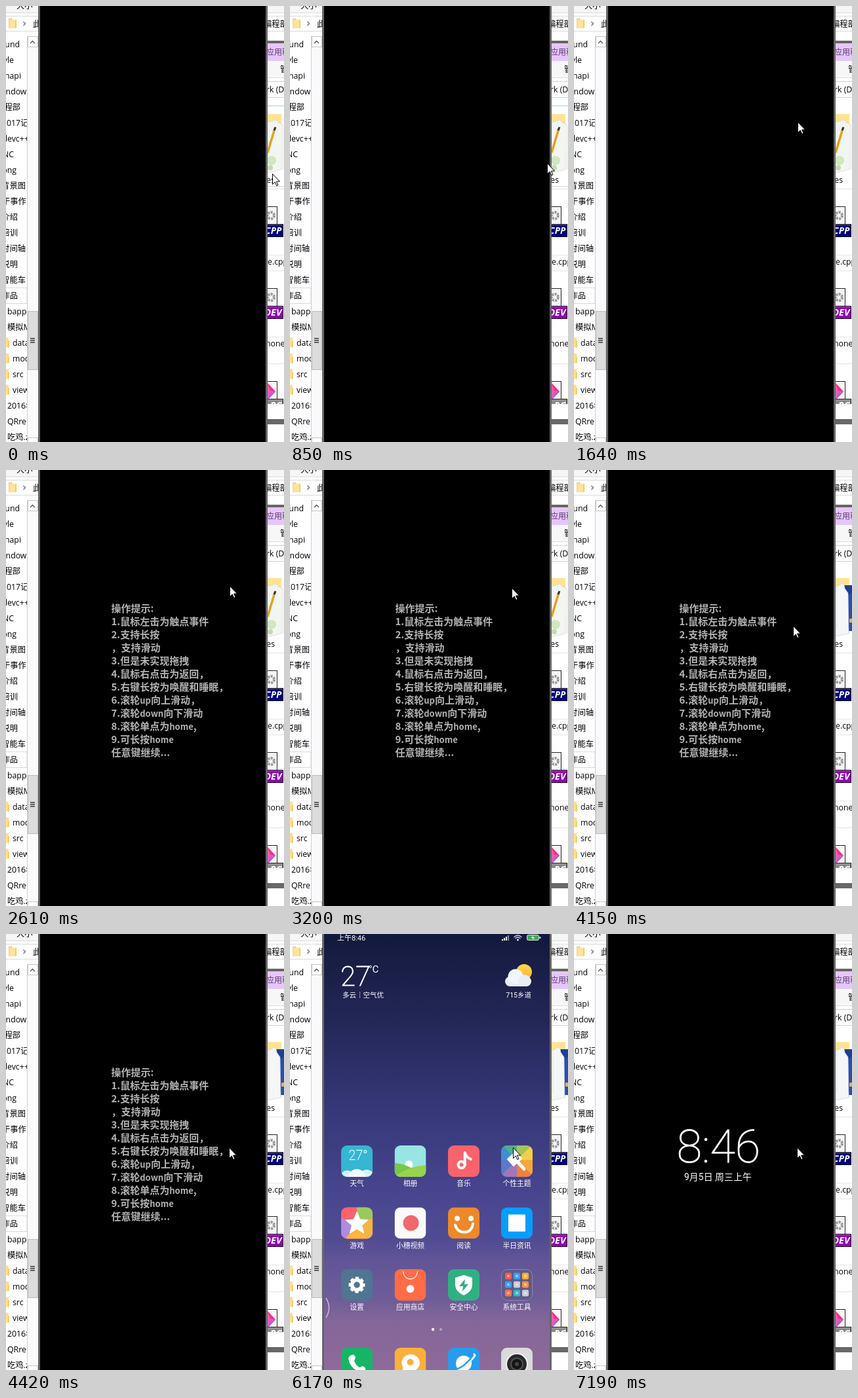
Animation of 424x666 px, one loop 8 s. Source, as an HTML page:

```html
<!DOCTYPE html>
<html lang="zh-CN">
<head>
<meta charset="utf-8">
<title>Phone mirror</title>
<style>
html, body { margin: 0; width: 100%; height: 100%; overflow: hidden; background: #fff; }
svg { display: block; }
text { font-family: "Open Sans", "Noto Sans CJK SC", sans-serif; white-space: pre; }
.phone text { font-family: Roboto, "Noto Sans CJK SC", sans-serif; fill: #fff; }
.hints text { font-family: "Noto Sans CJK SC", sans-serif; font-weight: 700; fill: #b2b2b2; }
.thin { font-weight: 100; stroke: #fff; }
</style>
</head>
<body>
<svg id="stage" width="424" height="666" viewBox="0 0 424 666">
  <defs>
    <linearGradient id="sky" x1="0" y1="0" x2="0" y2="1">
      <stop offset="0" stop-color="#13193c"/>
      <stop offset=".2" stop-color="#232757"/>
      <stop offset=".4" stop-color="#363779"/>
      <stop offset=".6" stop-color="#48468f"/>
      <stop offset=".7" stop-color="#514b93"/>
      <stop offset=".75" stop-color="#615597"/>
      <stop offset=".84" stop-color="#6f5d98"/>
      <stop offset=".89" stop-color="#856699"/>
      <stop offset="1" stop-color="#8d6a99"/>
    </linearGradient>
    <linearGradient id="sun" x1="0" y1="0" x2="0" y2="1">
      <stop offset="0" stop-color="#ffd84a"/><stop offset="1" stop-color="#ffae2e"/>
    </linearGradient>
    <clipPath id="tile"><rect width="48" height="48" rx="9"/></clipPath>
    <clipPath id="screen"><rect x="52" width="344" height="666"/></clipPath>
  </defs>
  <rect width="424" height="666" fill="#fff"/>
  <g id="left"></g>
  <g id="right"></g>
  <rect x="49" width="350" height="666" fill="#666"/>
  <rect x="52" width="344" height="666" fill="#000"/>
  <g class="hints" id="hints"></g>
  <g class="phone" id="home" clip-path="url(#screen)"></g>
  <g class="phone" id="lock">
    <text class="thin" x="220.5" y="349" font-size="70" text-anchor="middle" stroke-width=".9">8:46</text>
    <text x="219.5" y="376" font-size="14" text-anchor="middle">9月5日 周三上午</text>
  </g>
  <path id="cursor" d="M.5 .5V16.5L4.3 12.9 6.8 18.6 9 17.6 6.5 12H11.5Z" fill="#fff" stroke="#000"/>
</svg>
<script>
const LOOP = 8000;
const $ = id => document.getElementById(id);
const rect = (x, y, w, h, fill, more = '') =>
  `<rect x="${x}" y="${y}" width="${w}" height="${h}" fill="${fill}" ${more}/>`;
const disc = (x, y, r, fill, more = '') => `<circle cx="${x}" cy="${y}" r="${r}" fill="${fill}" ${more}/>`;
const shape = (d, fill, more = '') => `<path d="${d}" fill="${fill}" ${more}/>`;
const line = (d, color, width = 1, more = '') => shape(d, 'none', `stroke="${color}" stroke-width="${width}" ${more}`);
const text = (x, y, s, size = 12.3, more = '') => `<text x="${x}" y="${y}" font-size="${size}" ${more}>${s}</text>`;
const END = 'text-anchor="end"', MID = 'text-anchor="middle"', ROUND = 'stroke-linecap="round"';

// Toolbar and address bar shared by both sides
const bars = (x, w) => rect(x, 0, w, 10, '#f5f6f7') + rect(x, 10, w, 1, '#dadbdc') +
  rect(x, 15, w, 1, '#d9d9d9') + rect(x, 38, w, 1, '#d9d9d9');

function leftPane() {
  // Each row: label, x, and whether x is the right edge
  const rows = [['ound', 21, 1], ['style', 12, 1], ['nnapi', 23, 1], ['indows', -3.5], ['编程部', 22, 1],
    ['2017记', -6], ['devc++', -5.5], ['VNC', 12, 1], ['png', 16, 1], ['背景图', 30, 1], ['干事作品', -6],
    ['介绍', 18, 1], ['培训', 18, 1], ['时间轴', 30, 1], ['说明', 18, 1], ['智能车', 30, 1], ['作品', 18, 1],
    ['bapp', 2], ['模拟M', 2], ['data', 10], ['mod', 10], ['src', 10], ['view', 10],
    ['2016年', 2], ['QRre', 2], ['吃鸡.z', 2]];
  let s = bars(0, 49) + text(16, 4, '大小') +
    shape('M4 19h5l1 2h6v13h-12z', '#f5cf69') + shape('M5 21h9v13h-9z', '#ffe39a') +
    line('M26.5 24l3 3-3 3', '#666', 1.2) + text(41, 31.5, '此') +
    rect(-1, 430.5, 33, 24, '#fff', 'stroke="#d9d9d9"');
  rows.forEach(([label, x, end], i) => {
    const y = 62.5 + i * 24;
    if (x === 10) s += rect(0, y - 12, 4, 15, '#ffe08a') + rect(3, y - 7, 1.5, 10, '#f0c04c');
    s += text(x, y, label, 12.3, end ? END : '');
  });
  return s + rect(32, 46, 17, 620, '#fafafc') + rect(32, 46, 1, 620, '#d0d0d0') +
    rect(33.5, 46.5, 15, 16, '#fff', 'stroke="#c4c4c4"') + line('M37 57l3.5-3.5 3.5 3.5', '#555', 1.4) +
    rect(33.5, 466.5, 15, 89, '#dcdcdc', 'stroke="#bcbcbc"') +
    [507, 510, 513].map(y => rect(37, y, 7, 1.6, '#444')).join('') +
    rect(33.5, 659.5, 15, 16, '#fff', 'stroke="#c4c4c4"');
}

const badge = (y, label, color) => rect(385.5, y + .5, 37, 19, color, 'stroke="#111"') +
  line(`M386 ${y + 1.5}h36`, '#fff', .6, 'opacity=".5"') +
  text(420.5, y + 15, label, 14.5, END + ' font-weight="700" font-style="italic" fill="#fff"');

const fileIcon = (y, label, color) => rect(385.5, y + .5, 28, 46, '#f4f4f4', 'stroke="#222"') +
  disc(404, y + 14, 5, 'none', 'stroke="#999" stroke-width="4" stroke-dasharray="3 1.5"') + badge(y + 27, label, color);

function rightPane() {
  return bars(399, 25) + text(393, 31.5, '编程部') +
    rect(399, 53, 25, 4, '#666') + rect(399, 57, 25, 27, '#e6c6fa') + text(397, 74.5, '应用程', 12, 'fill="#5b3a70"') +
    rect(399, 84, 25, 26, '#f7f7f8') + text(418, 100.5, '管') + rect(399, 109, 25, 1, '#dadbdc') +
    rect(399, 115, 25, 1, '#d0d0d0') + rect(399, 139, 25, 1, '#d0d0d0') + text(397, 131.5, 'rk (D') +
    // folder preview, two states
    shape('M399 165h21v85h-21z', '#ffe394') +
    `<g id="sketch">` + shape('M399 178l13-4 3 4 7 3-3 69-20 5z', '#f3f5f3', 'stroke="#d5d8d2" stroke-width=".7"') +
    disc(405, 236, 7, '#b9dd9d', 'opacity=".6"') + disc(403, 247, 4, '#8fc56f', 'opacity=".5"') +
    line('M399 224l11-37', '#e6a11b', 3.5) + line('M409 190l2-5', '#333', 3) + shape('M420 183h4v67h-5z', '#f1f3ee') + `</g>` +
    `<g id="photo">` + rect(404, 176, 20, 70, '#1d3f95') +
    shape('M404 205l20-18v59h-20z', '#284fae') + rect(414, 220, 5, 6, '#e8503e') + rect(420, 227, 4, 6, '#f2b04a') +
    shape('M399 179l10-6q4 2 4 8l5 7 1 62-20 4z', '#f5f6f8', 'stroke="#d0d4da" stroke-width=".7"') +
    line('M401 180v64', '#e3e5ea') + `</g>` +
    text(410, 269.5, 'es', 12.3, END) +
    rect(399, 279, 25, 1, '#e2e2e2') +
    `<g id="hover">` + rect(399, 152, 25, 1, '#99d1ff') + rect(399, 275, 25, 1, '#c9d6df') + `</g>` +
    fileIcon(306, 'CPP', '#00007e') + rect(399, 380, 25, 1, '#e6e6e6') + text(399, 394.5, 'e.cpp') + rect(399, 404, 25, 1, '#e2e2e2') +
    fileIcon(431, 'DEV', '#9300b5') + rect(399, 505, 25, 1, '#e6e6e6') + text(396, 519.5, 'none.') + rect(399, 546, 25, 1, '#e2e2e2') +
    rect(385.5, 573.5, 28, 46, '#f8f8f8', 'stroke="#222"') +
    shape('M399 576l12 13-12 13z', '#f05cae') + shape('M399 576l12 13-8-1z', '#f2337c') + shape('M399 602l12-13-8 1z', '#b45cf0') +
    badge(600, 'RC', '#8b8b8b') +
    rect(399, 608, 25, 23, '#fff') + rect(399, 631, 25, 8, '#686868');
}

const wedges = (cx, cy, colors) => colors.map((c, i) => {
  const p = k => { const a = k / colors.length * 2 * Math.PI; return `${cx + 60 * Math.sin(a)} ${cy - 60 * Math.cos(a)}`; };
  return shape(`M${cx} ${cy}L${p(i)}L${p(i + 1)}Z`, c);
}).join('');

const star = (cx, cy, r) => shape('M' + Array.from({ length: 10 }, (_, i) => {
  const a = i * Math.PI / 5, q = i % 2 ? r * .45 : r;
  return `${cx + q * Math.sin(a)} ${cy - q * Math.cos(a)}`;
}).join('L') + 'Z', '#fff', 'stroke="#fff" stroke-linejoin="round"');

const apps = [
  ['天气', '#35b6d3', text(26, 22, '27°', 20, MID + ' class="thin" stroke-width=".4"') +
    disc(9, 48, 10, '#d9f1f6') + disc(39, 49, 12, '#d9f1f6') + disc(24, 49, 13, '#f4fbfc')],
  ['相册', '#97e6e3', disc(22, 29, 6, '#fff') + shape('M0 27Q14 27 30 37L48 48H0Z', '#79c64a') + shape('M0 47Q24 31 48 30V48H0Z', '#98d24e')],
  ['音乐', '#f8636c', disc(20.5, 29.5, 5, 'none', 'stroke="#fff" stroke-width="4"') + line('M25.7 30V11q2 7 9 10', '#fff', 4, 'stroke-linejoin="round" ' + ROUND)],
  ['个性主题', '#4a8fd8', wedges(24, 22, ['#a6c356', '#f2cf48', '#f6a93a', '#f0803e', '#a276b8', '#5b79c8', '#3f8fd0', '#4fb08c']) +
    shape('M10 21L22 10 31 20 19 31Z', '#fff', 'stroke="#fff" stroke-width="2" stroke-linejoin="round"') + line('M25 25L35 36', '#fff', 5, ROUND)],
  ['游戏', '#f8636c', wedges(24, 24, ['#9cc95f', '#f3b545', '#ffb53d', '#b08ade', '#f8636c']) + star(24, 25, 18)],
  ['小穗视频', '#fafafa', disc(25, 24, 12, '#f0696f')],
  ['阅读', '#ed882b', disc(14, 17, 4, '#fff') + disc(35, 17, 4, '#fff') + line('M11 27Q14 38 25 38T38 25', '#fff', 4, ROUND)],
  ['半日资讯', '#069efc', rect(11, 11, 26, 26, '#fff')],
  ['设置', '#507492', disc(24, 24, 7.5, 'none', 'stroke="#fff" stroke-width="5.5"') +
    disc(24, 24, 10.8, 'none', 'stroke="#fff" stroke-width="3.4" stroke-dasharray="5.2 3.28" stroke-dashoffset="2.6"')],
  ['应用商店', '#ff6c46', line('M13 4Q15 15 24 15T35 4', '#fff', 1.3, ROUND) + disc(24, 30, 6, '#fff')],
  ['安全中心', '#30b082', shape('M24 9l13 4v11q0 10-13 16q-13-6-13-16V13z', '#fff') + shape('M26 15l-9 11h6l-1 8 9-11h-6z', '#30b082')],
  ['系统工具', '#5f5a8c', rect(.5, .5, 47, 47, 'none', 'rx="9" stroke="#8f88ad"') +
    ['#fb5b50', '#3aa0f0', '#ffb02e', '#3a9ff0', '#c9ccd8', '#ff8f3b', '#ff7043', '#34b6c8', '#c9ccd8'].map((c, i) => {
      const x = 6 + i % 3 * 13, y = 5.5 + (i / 3 | 0) * 13;
      return rect(x, y, 10, 10, c, 'rx="2"') + disc(x + 5, y + 5, 2, '#fff', 'opacity=".5"');
    }).join('')],
  ['', '#16b566', shape('M16 11q4-2 6 4l-2 5q2 7 8 10l5-2q5 2 4 6q-4 6-12 2q-12-7-14-19q0-4 5-6z', '#fff')],
  ['', '#fbb03a', shape('M24 10a14 13 0 1 1-7 24l-6 3 2-7a14 13 0 0 1 11-20z', '#fff') + disc(24, 22, 5, '#fbb03a')],
  ['', '#279cee', disc(24, 24, 12, '#fff') + line('M8 36Q12 38 28 25T40 10', '#fff', 3, ROUND) + line('M13 33Q24 29 35 16', '#279cee', 2.5)],
  ['', '#dadada', disc(24, 25, 17, '#f3f3f3') + disc(24, 25, 15, '#2a2a2a') + disc(24, 25, 10, '#555') + disc(24, 25, 8, '#161616') + disc(24, 25, 3, '#444')]
];

function homeScreen() {
  const colX = [78, 159.5, 241, 322], rowY = [323, 417.5, 512, 632];
  let s = rect(52, 0, 344, 666, 'url(#sky)') + text(72, 10, '上午8:46', 11) +
    [0, 1, 2, 3].map(i => rect(323 + i * 3, 8 - i * 2, 2, 2 + i * 2, '#fff', i > 2 ? 'opacity=".5"' : '')).join('') +
    line('M341.5 5q6-6 12 0M343.5 7q4-4 8 0', '#c9cbdc', 1.2) + disc(347.5, 9, 1.4, '#fff') +
    rect(361.5, 1.5, 18, 8, '#37b24a', 'rx="2" stroke="#e6e6e6"') + rect(380.5, 4, 1.8, 3, '#e6e6e6') +
    shape('M371.5 2l-4 4h3l-1 3 4-4h-3z', '#fff') +
    text(77, 79, '27', 42, 'class="thin" stroke-width="1"') + text(120, 58.5, '°C', 15) +
    text(80, 97, '多云｜空气优', 10.5) + text(368, 97, '715乡道', 10.5, END) +
    disc(357, 58, 12, 'url(#sun)') +
    rect(328, 65, 40, 15, '#e6edf9', 'rx="7.5"') + disc(344, 65, 11.5, '#f1f5fc') + disc(358, 71, 9, '#e6edf9') +
    line('M55 556q9 15 0 30', '#fff', 1.6, 'opacity=".55"') +
    disc(218, 604, 2.2, '#fff') + disc(230, 604, 2.2, '#fff', 'opacity=".35"');
  apps.forEach(([name, color, art], i) => {
    const x = colX[i % 4], y = rowY[i >> 2];
    s += `<g transform="translate(${x} ${y})" clip-path="url(#tile)">${rect(0, 0, 48, 48, color)}${art}</g>` +
      text(x + 24, y + 62, name, 10.8, MID);
  });
  return s;
}

const hints = ['操作提示:', '1.鼠标左击为触点事件', '2.支持长按', '，支持滑动', '3.但是未实现拖拽', '4.鼠标右点击为返回，',
  '5.右键长按为唤醒和睡眠，', '6.滚轮up向上滑动，', '7.滚轮down向下滑动', '8.滚轮单点为home,', '9.可长按home', '任意键继续...'];
const small = s => s.replace(/[a-z]+/g, '<tspan font-size="13">$&</tspan>');

$('left').innerHTML = leftPane();
$('right').innerHTML = rightPane();
$('hints').innerHTML = hints.map((h, i) => text(160.5, 217 + i * 20, small(h), 15)).join('');
$('home').innerHTML = homeScreen();

// Hold each value until the next step
function play(id, prop, steps) {
  const frames = steps.map(([t, value]) => ({ offset: t / LOOP, [prop]: value, easing: 'step-end' }));
  frames.push({ offset: 1, [prop]: steps[steps.length - 1][1] });
  $(id).animate(frames, { duration: LOOP, iterations: Infinity });
}

const path = [[0, 406, 256], [150, 368, 246], [270, 341, 238], [420, 340, 238], [540, 404, 250], [850, 392, 240],
  [970, 374, 225], [1120, 366, 214], [1240, 354, 198], [1370, 345, 184], [1490, 341, 178], [1640, 341, 177],
  [3200, 338, 180], [3320, 335, 184], [4150, 334, 238], [4270, 334, 298], [4420, 340, 326]];
play('cursor', 'transform', path.map(([t, x, y]) => [t, `translate(${x}px, ${y}px)`]));
play('hover', 'opacity', [[0, 1], [270, 0], [540, 1], [970, 0]]);
play('hints', 'opacity', [[0, 0], [2610, 1], [6170, 0]]);
play('home', 'opacity', [[0, 0], [6170, 1], [7190, 0]]);
play('lock', 'opacity', [[0, 0], [7190, 1]]);
play('sketch', 'opacity', [[0, 1], [3750, 0]]);
play('photo', 'opacity', [[0, 0], [3750, 1]]);
</script>
</body>
</html>
```
